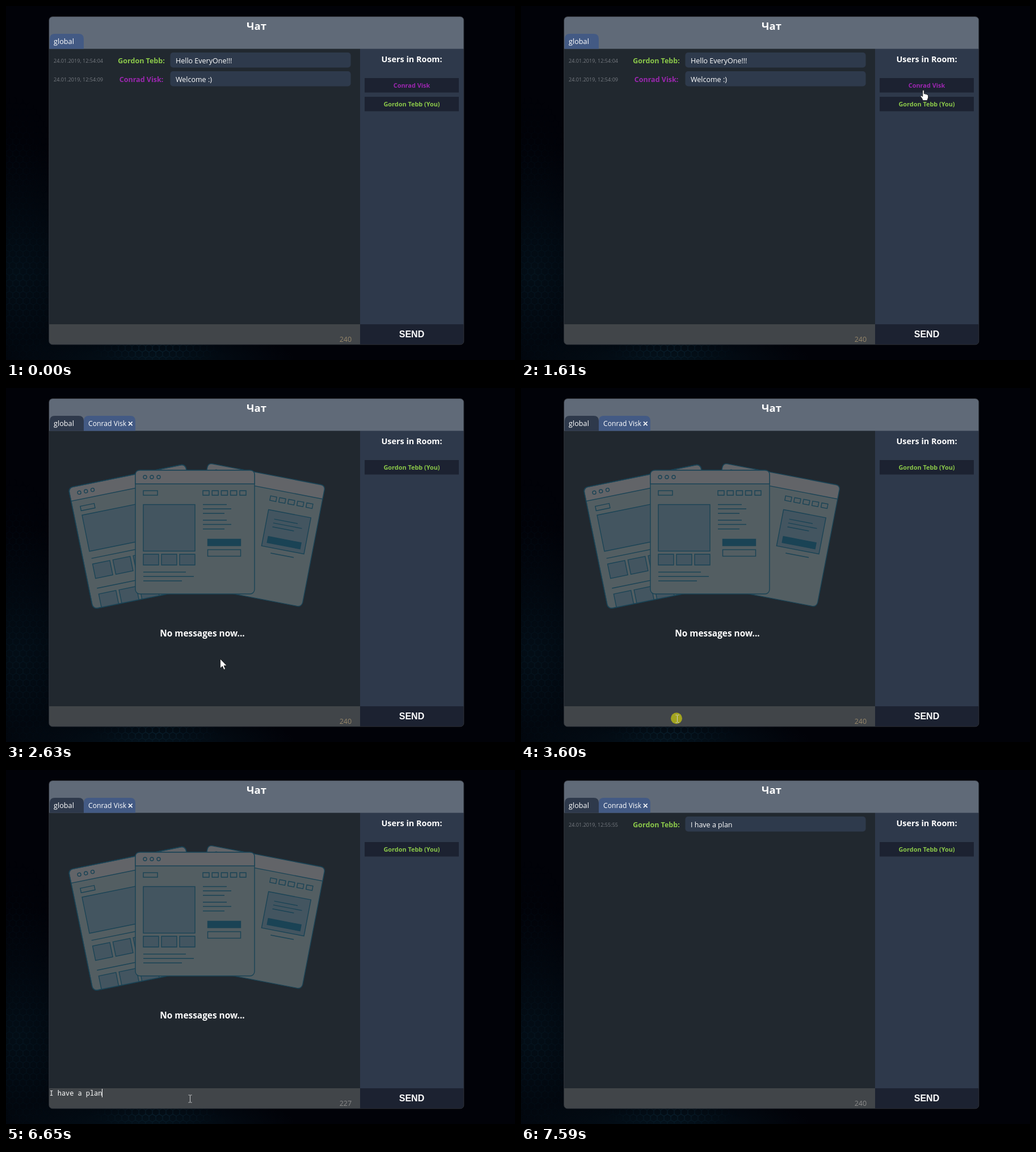
Write an HTML page that moves like this. It is 897 px wide and 624 px high and loops after 8000 ms.

```html
<!DOCTYPE html>
<html lang="en">
<head>
<meta charset="utf-8">
<title>Chat room</title>
<style>
  html, body { margin: 0; width: 100%; height: 100%; overflow: hidden; background: #010208; }
  svg { display: block; width: 897px; height: 624px; }
  text { font-family: "Open Sans", "Noto Sans", sans-serif; font-size: 12.5px; fill: #fff; white-space: pre; }
  .bold { font-weight: 700; }
  .mid { text-anchor: middle; }
  .date { font-size: 9.1px; fill: #767a80; }
  .me { fill: #8bc84a; }
  .peer { fill: #9c27b0; }
  .user { font-size: 10.9px; }
  .bubble { fill: #2e3a4c; }
  .dark { fill: #1c2231; }
  .typed { font-family: "Noto Sans Mono", "DejaVu Sans Mono", monospace; font-size: 11.92px; }
  .send { font: 700 16px "Liberation Sans", Arial, sans-serif; }
  .art { stroke: #1a4355; stroke-width: 1.4; fill: none; }
  .page { fill: #535e62; }
  .bar { fill: #626468; }
  .pic { fill: #435560; }
  .solid { fill: #1a4355; }
</style>
</head>
<body>
<svg viewBox="0 0 897 624">
  <defs>
    <radialGradient id="glow">
      <stop offset="0" stop-color="#fff"/>
      <stop offset="1" stop-color="#fff" stop-opacity="0"/>
    </radialGradient>
    <radialGradient id="haze">
      <stop offset="0" stop-color="#04121c"/>
      <stop offset="1" stop-color="#04121c" stop-opacity="0"/>
    </radialGradient>
    <pattern id="comb" width="12" height="20.8" patternUnits="userSpaceOnUse">
      <path d="M6 0V3.5L0 6.9V13.9L6 17.3V20.8M6 3.5L12 6.9V13.9L6 17.3" fill="none" stroke="#0d2c3e"/>
    </pattern>
    <mask id="patches">
      <ellipse cx="265" cy="608" rx="120" ry="26" fill="url(#glow)" opacity=".75"/>
      <ellipse cx="25" cy="490" rx="85" ry="170" fill="url(#glow)" opacity=".35"/>
      <ellipse cx="15" cy="270" rx="70" ry="110" fill="url(#glow)" opacity=".18"/>
    </mask>
    <clipPath id="panel"><rect x="76" y="19" width="730.5" height="577.5" rx="6"/></clipPath>
    <clipPath id="sheet"><rect width="210" height="218" rx="8"/></clipPath>
    <g id="window">
      <rect class="page" width="210" height="218" rx="8"/>
      <path class="bar" d="M0 24V8Q0 0 8 0H202Q210 0 210 8V24Z"/>
      <circle cx="17" cy="12" r="3"/><circle cx="29" cy="12" r="3"/><circle cx="41" cy="12" r="3"/>
    </g>
    <rect id="logo" x="14" y="36" width="25" height="8"/>
    <path id="nav" d="M119 36h11v8h-11zM135.2 36h11v8h-11zM151.4 36h11v8h-11zM167.6 36h11v8h-11zM184 36h11v8h-11z"/>
  </defs>

  <rect width="897" height="624" fill="#010208"/>
  <ellipse cx="20" cy="470" rx="190" ry="230" fill="url(#haze)" opacity=".7"/>
  <ellipse cx="250" cy="625" rx="260" ry="60" fill="url(#haze)"/>
  <rect width="897" height="624" fill="url(#comb)" mask="url(#patches)"/>

  <g clip-path="url(#panel)">
    <rect x="76" y="19" width="731" height="57" fill="#606a78"/>
    <rect x="76" y="75.5" width="548" height="486" fill="#21282f"/>
    <rect x="624" y="75.5" width="183" height="486" fill="#2e394b"/>
    <rect x="76" y="561" width="548" height="36" fill="#414549"/>
    <rect x="624" y="561" width="183" height="36" class="dark"/>
  </g>
  <rect x="75.8" y="18.8" width="731" height="578" rx="6" fill="none" stroke="#42474e" stroke-width=".7"/>
  <text class="bold mid" x="441.5" y="42" style="font-size:18.5px">Чат</text>

  <path id="globalTab" d="M77 75.5V58Q77 49 86 49H128Q137 49 137 58V75.5Z"/>
  <text x="84" y="67" style="font-size:12.7px">global</text>
  <g id="privateTab">
    <path d="M137 75.5V58Q137 49 146 49H219Q228 49 228 58V75.5Z" fill="#435a84"/>
    <text x="145" y="67" style="font-size:12.2px">Conrad Visk</text>
    <path d="M216 59.5l6.6 6.6m0-6.6l-6.6 6.6" stroke="#fff" stroke-width="1.7"/>
  </g>

  <text class="bold mid" x="715" y="99" style="font-size:14.4px">Users in Room:</text>
  <g id="peerRow">
    <rect class="dark" x="632" y="127" width="166" height="25.5"/>
    <text class="bold mid peer user" x="715" y="144">Conrad Visk</text>
  </g>
  <g id="myRow">
    <rect class="dark" x="632" y="127" width="166" height="25.5"/>
    <text class="bold mid me user" x="715" y="144">Gordon Tebb (You)</text>
  </g>

  <g id="globalLog">
    <text class="date" x="84" y="99.5">24.01.2019, 12:54:04</text>
    <text class="bold mid me" x="238.5" y="101">Gordon Tebb:</text>
    <rect class="bubble" x="289.5" y="82" width="318" height="26.5" rx="5"/>
    <text x="299" y="101">Hello EveryOne!!!</text>
    <text class="date" x="84" y="132.5">24.01.2019, 12:54:09</text>
    <text class="bold mid peer" x="238.5" y="134">Conrad Visk:</text>
    <rect class="bubble" x="289.5" y="115" width="318" height="26.5" rx="5"/>
    <text x="299" y="134">Welcome :)</text>
  </g>

  <g id="emptyLog">
    <g class="art" transform="translate(110 176) rotate(-11.5)">
      <use href="#window"/><use href="#logo"/>
      <g clip-path="url(#sheet)">
        <rect class="pic" x="14" y="52" width="182" height="65"/>
        <path d="M15 130H165M14 183.5H165"/>
        <path class="pic" d="M15 140h31v26h-31zM51.5 140h31v26h-31zM88 140h31v26h-31zM15 194h31v30h-31zM51.5 194h31v30h-31zM88 194h31v30h-31z"/>
      </g>
      <rect width="210" height="218" rx="8"/>
    </g>
    <g class="art" transform="translate(356.3 132.3) rotate(10.9)">
      <use href="#window"/><use href="#nav"/>
      <rect class="pic" x="120" y="60.5" width="76" height="65"/>
      <path d="M133 75H175M132.5 82H184M132.5 89H171M138 135H179.5"/>
      <rect class="solid" x="128.5" y="107" width="59" height="11"/>
    </g>
    <g class="art" transform="translate(228 145)">
      <use href="#window"/><use href="#logo"/><use href="#nav"/>
      <rect class="pic" x="14" y="60.5" width="91" height="82"/>
      <path d="M119 60.5H161M119 68H169M119 76H157M119 88H161M119 95.5H169M119 103.5H157"/>
      <rect class="solid" x="127.5" y="121.5" width="58" height="11.5"/>
      <rect x="127.5" y="140" width="58" height="11.5"/>
      <path class="pic" d="M14 148h27v19h-27zM46 148h27v19h-27zM78 148h27v19h-27z"/>
      <path d="M14 179.5H89M14 187.3H103M14 195H82"/>
    </g>
    <text class="bold mid" x="346" y="438" style="font-size:15.4px">No messages now...</text>
  </g>

  <g id="privateLog">
    <text class="date" x="84" y="99.5">24.01.2019, 12:55:55</text>
    <text class="bold mid me" x="238.5" y="101">Gordon Tebb:</text>
    <rect class="bubble" x="289.5" y="82" width="318" height="26.5" rx="5"/>
    <text x="299" y="101">I have a plan</text>
  </g>

  <text id="typed" class="typed" x="76.5" y="574"></text>
  <rect id="caret" y="562" width="1" height="15" fill="#fff"/>
  <text id="counter" x="587.7" y="592"></text>
  <text class="send mid" x="715" y="583.5">SEND</text>

  <circle id="click" r="10" fill="#a3a41f"/>
  <g id="pointer">
    <path id="arrow" d="M0 0V16.5L3.8 13L6.3 19L9 17.8L6.5 12H11.5Z" fill="#fff" stroke="#111" stroke-width=".8"/>
    <path id="hand" d="M-1.2 1.5Q0 -.8 1.4 1.5V7Q3 5.8 4 7.5Q5.6 6.6 6.4 8.3Q8.4 7.6 8.6 10V13.5L6.8 18.5H-.8Q-2 14.5-5 11.2Q-4.6 8.6-1.2 11.6Z" fill="#fff" stroke="#111" stroke-width=".8"/>
    <path id="beam" d="M-3 -6.5H-.8L0 -5.8L.8 -6.5H3M0 -5.8V5.8M-3 6.5H-.8L0 5.8L.8 6.5H3" fill="none" stroke="#c9cbcc"/>
  </g>
</svg>
<script>
const LOOP = 8000, OPEN = 1970, SENT = 7160, LEAVE = 7590;
const MESSAGE = "I have a plan", CHAR = 7.15;
const KEYS = [4520, 4800, 4850, 5030, 5210, 5440, 5640, 5910, 6060, 6240, 6370, 6520, 6650];

// Pointer moves: start, end, steps, Bezier points
const MOVES = [
  [130, 870, 16, [817, 600], [770, 450], [640, 240], [709, 151]],
  [1100, 1100, 1, [709, 151], [709, 150], [709, 149], [709, 148]],
  [2300, 2810, 12, [709, 148], [610, 250], [380, 470], [275.5, 583]],
  [3700, 3910, 5, [275.5, 583], [290, 583], [310, 581], [324.5, 579.5]]
];

const $ = id => document.getElementById(id);
const show = (id, on) => $(id).setAttribute("display", on ? "inline" : "none");
const within = (t, a, b) => t >= a && t < b;

function pointerAt(t) {
  const [a, b, n, ...pts] = MOVES.filter(m => t >= m[0]).pop() || MOVES[0];
  const step = b > a ? Math.floor((t - a) / (b - a) * (n - 1) + 1e-6) + 1 : n;
  const p = Math.max(0, Math.min(1, step / n));
  const s = p * p * (3 - 2 * p), r = 1 - s;
  const w = [r * r * r, 3 * r * r * s, 3 * r * s * s, s * s * s];
  return [0, 1].map(k => w.reduce((sum, wi, i) => sum + wi * pts[i][k], 0));
}

function pointerShape(x, y, t) {
  const inInput = x > 76 && x < 624 && y > 561 && y < 597;
  const inSend = x >= 624 && x < 806 && y > 561 && y < 597;
  const inUsers = x > 632 && x < 798 && (within(y, 127, 152.5) || t < OPEN && within(y, 160, 185.5));
  return inInput ? "beam" : inSend || inUsers ? "hand" : "arrow";
}

function drawPointer(t) {
  const [x, y] = pointerAt(t), shape = pointerShape(x, y, t);
  show("pointer", within(t, 130, LEAVE));
  $("pointer").setAttribute("transform", `translate(${x.toFixed(1)} ${y.toFixed(1)})`);
  for (const id of ["arrow", "hand", "beam"]) show(id, id === shape);
  show("click", within(t, 1510, 1610) || within(t, 3600, 3700));
  $("click").setAttribute("transform", t < 2000 ? "translate(708 147.7)" : "translate(274 582.3)");
}

function drawInput(t) {
  const count = t < SENT ? KEYS.filter(k => t >= k).length : 0;
  $("typed").textContent = MESSAGE.slice(0, count);
  $("counter").textContent = 240 - count;
  $("counter").style.fill = t < KEYS[0] ? "#95866a" : "#8b8b8b";
  $("caret").setAttribute("x", Math.round(76.2 + count * CHAR));
  show("caret", within(t, 3630, 4140) || within(t, KEYS[0], LEAVE));
}

function draw(t) {
  const opened = t >= OPEN;
  $("globalTab").setAttribute("fill", opened ? "#2e394b" : "#435a84");
  show("privateTab", opened);
  show("peerRow", !opened);
  $("myRow").setAttribute("transform", `translate(0 ${opened ? 0 : 33})`);
  show("globalLog", !opened);
  show("emptyLog", within(t, OPEN, SENT));
  show("privateLog", t >= SENT);
  drawInput(t);
  drawPointer(t);
}

const start = performance.now();
function tick() {
  draw((performance.now() - start) % LOOP);
  requestAnimationFrame(tick);
}
tick();
</script>
</body>
</html>
```
